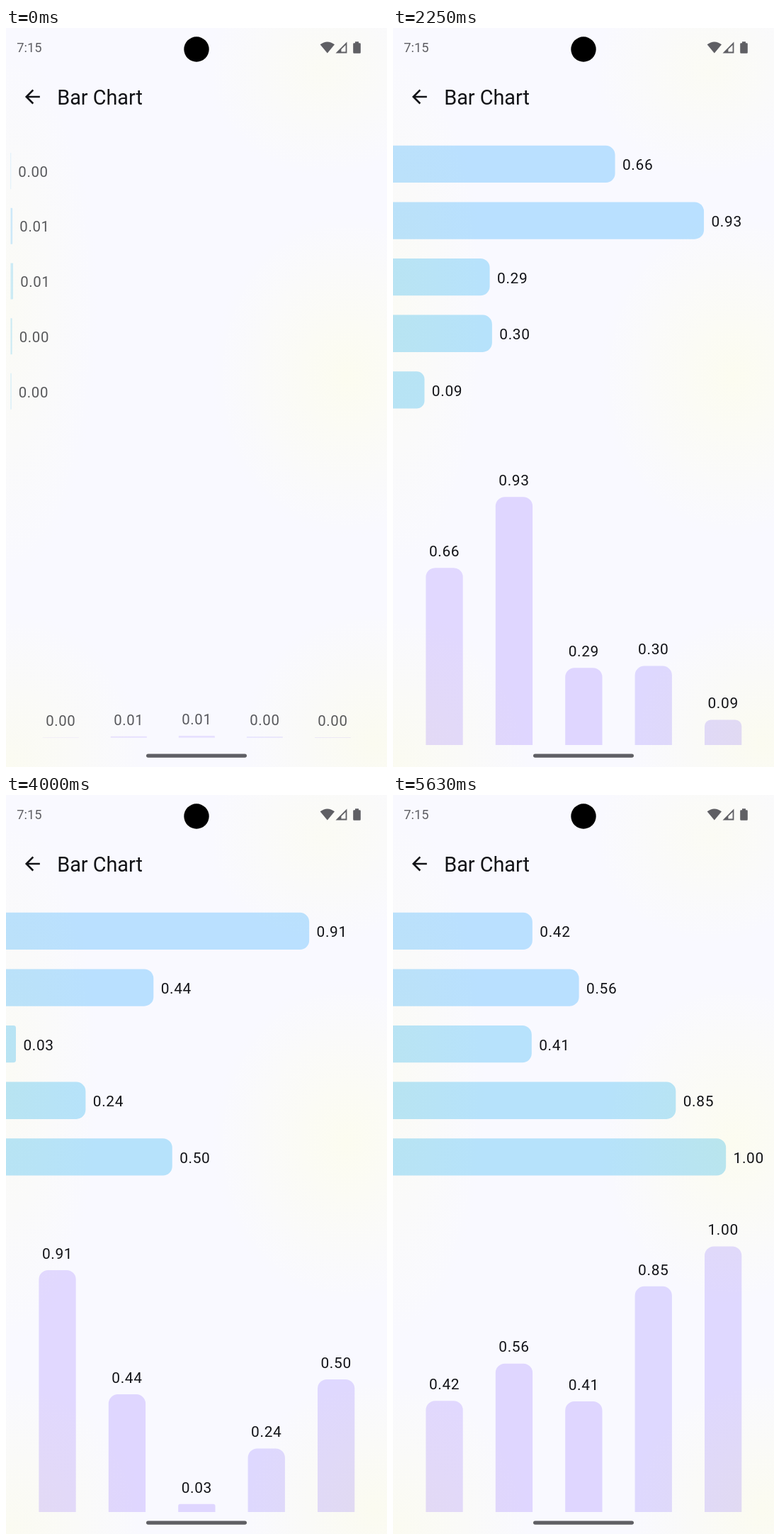
An HTML page for the animation above (5680 ms loop, 538x1042 px).

```html
<!DOCTYPE html>
<html lang="en">
<head>
<meta charset="utf-8">
<title>Bar Chart</title>
<style>
  html, body { margin: 0; width: 100%; height: 100%; overflow: hidden; }
  body {
    background:
      radial-gradient(ellipse 190px 230px at 480px 490px, #fcfcf0, #fcfcf000),
      radial-gradient(ellipse 170px 150px at 450px 60px, #fbfbf4, #fbfbf400),
      radial-gradient(ellipse 190px 190px at 520px 1010px, #fbfbf0, #fbfbf000),
      radial-gradient(ellipse 130px 380px at 0 400px, #fbfbf5, #fbfbf500),
      radial-gradient(ellipse 200px 220px at 0 1042px, #fbfbf1, #fbfbf100),
      #f9f9ff;
  }
  svg { display: block; width: 538px; height: 1042px; }
  text { font-family: Roboto, sans-serif; }
  #chart { mix-blend-mode: multiply; }
  #chart text { font-size: 20.9px; letter-spacing: .65px; fill: #121317; }
</style>
</head>
<body>
<svg viewBox="0 0 538 1042">
  <g id="chart"></g>
  <g fill="#5f5f64">
    <text x="15.3" y="34.4" font-size="18.3">7:15</text>
    <path d="M453.8 35.6 443.6 23.3Q453.8 15.6 464 23.3Z"/>
    <path d="M465.5 35.4 481.4 19.5V35.4ZM473.4 33.6H479.6V23.9L473.4 30.1Z" fill-rule="evenodd"/>
    <path d="M493 19.2h5v2h1.5q1.3 0 1.3 1.3v12q0 1.3-1.3 1.3h-8q-1.3 0-1.3-1.3v-12q0-1.3 1.3-1.3h1.5z"/>
    <rect x="198" y="1023.4" width="142" height="5.4" rx="2.7"/>
  </g>
  <circle cx="269" cy="30" r="17.7"/>
  <path fill="#121317" transform="translate(21.7 81.3) scale(1.307)"
    d="M20 11H7.83l5.59-5.59L12 4l-8 8 8 8 1.41-1.41L7.83 13H20z"/>
  <text x="72.2" y="107.8" font-size="28.8" fill="#121317">Bar Chart</text>
</svg>
<script>
const LOOP = 5680;
const THICK = 52.3, FULL_W = 472.3, FULL_H = 376.3, BASE = 1011;
const ROW = { start: 165.8, step: 79.6 };
const COL = { start: 46.4, step: 98.4 };

// Each data set: start time, duration, five values
const sets = [
  { at: -117, dur: 954, v: [.0375, .1538, .2047, .122, .061] },
  { at: 1442, dur: 900, v: [.68, .9495, .2914, .3006, .095] },
  { at: 2942, dur: 900, v: [.9065, .441, .0296, .238, .497] },
  { at: 4442, dur: 900, v: [.4168, .556, .4146, .8455, .9955] }
];
const rowColors = ['#bfe6ff', '#bee6ff', '#bce8fc', '#bbe8fb', '#bbe8fb'];
const colColors = ['#e7deff', '#e5dcff', '#e5dcff', '#e4deff', '#e5deff'];

const chart = document.getElementById('chart');
const add = (tag, attrs) => {
  const el = document.createElementNS('http://www.w3.org/2000/svg', tag);
  for (const k in attrs) el.setAttribute(k, attrs[k]);
  return chart.appendChild(el);
};

const bars = rowColors.map((fill, i) => {
  const y = ROW.start + i * ROW.step, x = COL.start + i * COL.step;
  return {
    x, y,
    row: add('path', { fill }),
    rowText: add('text', { y: y + THICK / 2 + 8.4 }),
    col: add('path', { fill: colColors[i] }),
    colText: add('text', { x: x + THICK / 2, 'text-anchor': 'middle' })
  };
});

const clamp = x => Math.min(1, Math.max(0, x));
const ease = x => (1 - Math.cos(Math.PI * clamp(x))) / 2;

const valueAt = (i, t) => sets.reduce(
  (v, s) => v + (s.v[i] - v) * ease((t - s.at) / s.dur), 0);

const radius = len => Math.min(len, THICK) / 4;

function rowPath(y, w) {
  const r = radius(w), b = y + THICK;
  return `M0 ${y}H${w - r}A${r} ${r} 0 0 1 ${w} ${y + r}V${b - r}A${r} ${r} 0 0 1 ${w - r} ${b}H0Z`;
}

function colPath(x, h) {
  const r = radius(h), top = BASE - h, e = x + THICK;
  return `M${x} ${BASE}V${top + r}A${r} ${r} 0 0 1 ${x + r} ${top}H${e - r}A${r} ${r} 0 0 1 ${e} ${top + r}V${BASE}Z`;
}

function draw(t) {
  // The screen content finishes fading and scaling in
  const left = .3 * (1 - clamp(t / 165)) ** 2;
  const s = 1 - left * .0817;
  chart.setAttribute('transform', `translate(269 592) scale(${s}) translate(-269 -592)`);
  chart.setAttribute('opacity', 1 - left);

  bars.forEach((b, i) => {
    const v = valueAt(i, t), w = v * FULL_W, h = v * FULL_H;
    b.row.setAttribute('d', rowPath(b.y, w));
    b.col.setAttribute('d', colPath(b.x, h));
    b.rowText.setAttribute('x', w + 10.4);
    b.colText.setAttribute('y', BASE - h - 16.3);
    b.rowText.textContent = b.colText.textContent = v.toFixed(2);
  });
}

const begin = performance.now();
function tick() {
  draw((performance.now() - begin) % LOOP);
  requestAnimationFrame(tick);
}
draw(0);
requestAnimationFrame(tick);
</script>
</body>
</html>
```
